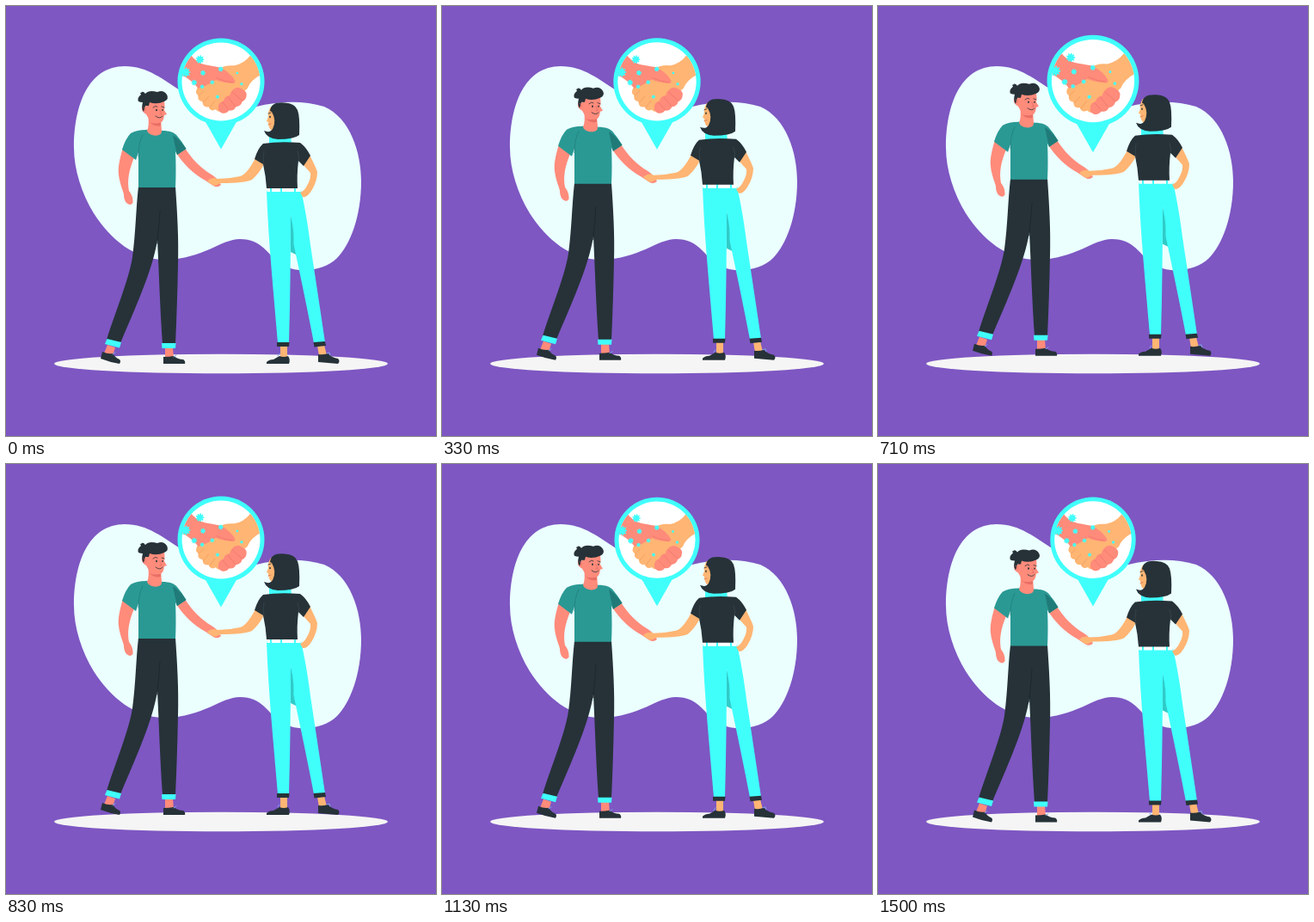
These frames come from a looping animation (500x500 px, 1540 ms). An HTML page with a canvas:

```html
<!DOCTYPE html>
<html lang="en">
<head>
<meta charset="utf-8">
<title>Handshake</title>
<style>
html, body { margin: 0; width: 100%; height: 100%; overflow: hidden; background: #7e57c2; }
canvas { display: block; }
</style>
</head>
<body>
<canvas id="stage" width="500" height="500"></canvas>
<script>
const ctx = document.getElementById('stage').getContext('2d');
const LOOP = 1540, STEP = 1000 / 24, LAST_STEP = 36;
const PURPLE = '#7e57c2', CYAN = '#40fffb', DARK = '#263238', TEAL = '#2a9994',
      ROSE = '#ff8b7b', PEACH = '#ffb573', ICE = '#ebffff', LACE = '#7ba4e8';

function fill(color, d) {
  ctx.fillStyle = color;
  ctx.fill(new Path2D(d));
}

function line(color, width, d) {
  ctx.strokeStyle = color;
  ctx.lineWidth = width;
  ctx.lineCap = ctx.lineJoin = 'round';
  ctx.stroke(new Path2D(d));
}

function oval(color, x, y, rx, ry = rx) {
  ctx.fillStyle = color;
  ctx.beginPath();
  ctx.ellipse(x, y, rx, ry, 0, 0, Math.PI * 2);
  ctx.fill();
}

function background() {
  ctx.fillStyle = PURPLE;
  ctx.fillRect(0, 0, 500, 500);
  fill(ICE, 'M138 70C165 70 183 86 204 99C235 119 262 123 291 117C315 111 345 109 370 117C400 130 413 170 413 204C413 245 400 278 385 293C370 308 338 313 318 299C304 289 298 271 272 271C250 271 230 294 185 295C150 295 122 272 102 241C88 218 79 190 79 165C79 115 96 70 138 70Z');
  oval('#f5f5f5', 250, 416, 194, 11.3);
}

function man() {
  // Ankles and shoes
  fill(ROSE, 'M118 394L127 397L124 407L114 404Z M185 396H194L195 410H185Z');
  fill(DARK, 'M112 402Q119 405 124 404Q127 409 132 411Q134 413 132 416Q120 414 110 410Z');
  fill(DARK, 'M183 408Q190 408 195 407Q200 411 206 411Q209 413 208 416H183Z');
  line(LACE, 1, 'M124 405L127 403 M195 408L198 406');
  // Trousers
  fill(DARK, 'M154 210H197C199 238 201 272 200 300Q199 350 197 393H182C179 350 178 312 176 272C171 306 149 354 133 392L117 388C127 356 143 318 147 292C151 262 151 236 154 210Z');
  line('#17242b', .7, 'M179 238Q178 256 175.5 276');
  fill(CYAN, 'M117.500 387L134 391L132 397.500L115 393Z M181 392H197.500L197 398H181.500Z');
  // Arms
  fill(ROSE, 'M136 165C132 178 130 188 131 196C132 206 136 214 137 219C137 226 140 231 145 231L147.500 229C148 223 146 219 143 215C141 204 142 192 150 174Z');
  fill(ROSE, 'M198 171L208 165C216 178 227 189 239 196Q247 201 250 208Q246 212 241 209L232 203C217 195 206 183 198 171Z');
  // Shirt
  fill(TEAL, 'M163 144Q173 142 182 145C190 145 196 147 199 151Q205 158 209.500 166L199 173L197 169Q198 192 197 211H154V170L151 179L135 167Q139 154 145 148Q152 144 163 144Z');
  fill('#207b78', 'M194 150Q202 155 209.500 166L199 173Q196 161 194 150Z');
  line('#207b78', .7, 'M159 150Q154 159 154 175');
  // Neck and head
  fill(ROSE, 'M165 126L180 132L181 145C182 153 166 152 164 145Q167 139 165 126Z');
  fill('#e96f66', 'M167 135Q173 138 180 135L180 139Q173 141 167 135Z');
  fill(ROSE, 'M162 109L184 110Q185 116 184 121L187 126L184 127Q183 136 178 136Q168 137 163 126Q157 123 158 117Q160 113 163 117Z');
  fill(DARK, 'M157 103Q152 107 154 111Q156 112 159 112Q157 119 160 123L162 116L166 116L167 112Q175 115 184 111Q190 108 187 103Q183 97 176 100Q166 97 162 102Q159 98 157 101Q155 100 157 103Z');
  line(DARK, .8, 'M171 118Q174 115 176 117 M181 117L184 118 M174 128Q179 132 182 128');
  oval(DARK, 175, 121, .9, 1.2);
  oval(DARK, 182, 121, .8, 1.1);
  line('#df6860', .7, 'M179 121L181 126L179 126');
  line('#df6860', .7, 'M160 118Q163 118 162 122');
}

function woman() {
  // Ankles and shoes
  fill(PEACH, 'M319 395H327V410H319Z M362 395L370 394L373 406L364 407Z');
  fill(DARK, 'M303 414Q306 411 311 411L318 407Q323 409 328 407Q331 411 329 416H303Z');
  fill(DARK, 'M363 405Q369 406 374 404Q379 409 386 410Q389 413 386 416L363 414Z');
  line(LACE, 1, 'M316 407L318 404 M373 404L376 403L377 406');
  // Trousers
  fill('#30cbc8', 'M330 238L339 290L331 286Z');
  fill(CYAN, 'M303 214H343C347 232 351 253 354 278Q363 337 371 391L358 392Q348 340 333 270L331 242Q331 322 329 392H316C311 331 305 273 303 214Z');
  fill('#30cbc8', 'M331 244Q336 263 334 281L331 272Z');
  fill(DARK, 'M315 391H329.500L329 396H315Z M357.500 391L371 390L372 395L358.500 396.500Z');
  fill('#ffffff', 'M303 211H342L343 216H303.500Z');
  fill(CYAN, 'M307 211H309V217H307Z M319 211H321V217H319Z M335 211H337V217H335Z');
  // Arms
  fill(PEACH, 'M290 177Q280 196 272 198Q259 201 246 201Q240 198 234 203Q237 207 243 209L250 206Q277 206 286 202Q294 195 300 184Z');
  fill(PEACH, 'M345 184L353 173Q361 189 362 193Q362 204 355 215Q350 223 345 222L342 217Q347 215 350 209Q355 200 354 194Z');
  // Collar and shirt
  fill(CYAN, 'M306 151Q318 155 331 151L332 161Q318 163 306 160Z');
  fill(DARK, 'M299 160Q318 157 342 159Q349 164 354 174L346 186L340 180Q338 197 339 212H303Q302 197 299 184L289 178Q293 165 299 160Z');
  line('#3b4950', .7, 'M300 169Q298 177 300 185 M339 169Q342 176 340 181');
  // Head
  fill(PEACH, 'M308 117Q304 123 305 129L303 134L305 135Q305 142 309 145L318 142V120Z');
  fill(DARK, 'M307 122Q308 111 324 112.500Q336 113 339 121Q342 129 341 150Q335 155 316 155Q303 154 300 145Q307 148 310 143Q315 133 309 123Z');
  line(DARK, .8, 'M305 125L308 124');
  oval(DARK, 307, 129, .8, 1.2);
  line('#d97451', .8, 'M305 138L308 137');
}

function virus(x, y, r) {
  oval(CYAN, x, y, r * .78);
  ctx.strokeStyle = CYAN;
  ctx.lineWidth = Math.max(.7, r * .34);
  ctx.beginPath();
  for (let i = 0; i < 9; i++) {
    const a = i * Math.PI * 2 / 9;
    ctx.moveTo(x, y);
    ctx.lineTo(x + Math.cos(a) * r * 1.1, y + Math.sin(a) * r * 1.1);
  }
  ctx.stroke();
}

function pin() {
  fill(CYAN, 'M230 130H270L250 165.300Z');
  oval(CYAN, 250, 88.200, 49.500);
  oval('#ffffff', 250, 88.200, 44.600);
  ctx.save();
  ctx.beginPath();
  ctx.arc(250, 88.200, 44.600, 0, Math.PI * 2);
  ctx.clip();
  // Right hand with its fingers below
  fill(PEACH, 'M300 45L283 59Q276 68 265 70Q254 69 247 74L224 94Q219 101 224 104Q223 110 229 111Q229 118 236 117Q238 123 244 120Q248 125 252 119L280 96Q284 85 300 78Z');
  line('#ed9b5f', .7, 'M225 104L230 99 M230 112L236 105 M237 118L243 110');
  // Left hand with its thumb and fingertips
  fill(ROSE, 'M200 47L214 56Q222 67 232 69L249 72Q261 78 266 87Q267 91 261 90Q251 89 244 86Q234 93 224 96Q217 86 200 78Z');
  fill(ROSE, 'M263 98Q268 93 273 96Q280 99 279 104Q279 109 274 111Q273 116 267 117Q265 122 259 121Q256 125 251 124Q246 122 247 117Q247 112 253 110Q254 105 260 104Q260 101 263 98Z');
  line('#ec7468', .7, 'M263 100L274 110 M258 106L266 116 M252 112L259 120 M245 84Q253 88 263 89');
  ctx.restore();
  virus(226, 63, 4.300);
  virus(209.500, 77.500, 5);
  virus(229.500, 78.300, 2.800);
  virus(219.500, 89.300, 3);
  virus(228.500, 94, 2.200);
  virus(249.800, 74, 2.700);
  virus(240, 89, 2.300);
  virus(246, 105.500, 2);
  virus(268.500, 78.500, 1.300);
  virus(273.500, 91, 1.600);
}

const beat = [[-70, 1], [150, 1.09], [430, 1], [530, 1], [700, 1.08], [900, 1], [1470, 1], [1690, 1.09]];

function beatScale(t) {
  const i = beat.findIndex(([end]) => end > t);
  const [t0, s0] = beat[i - 1], [t1, s1] = beat[i];
  const p = (1 - Math.cos(Math.PI * (t - t0) / (t1 - t0))) / 2;
  return s0 + (s1 - s0) * p;
}

function bobOffset(t) {
  const phase = ((t + 45) % LOOP) / LOOP;
  return .6 - 10 * (1 - Math.abs(2 * phase - 1));
}

function draw(now) {
  const elapsed = now % LOOP;
  const t = Math.min(LAST_STEP, Math.floor(elapsed / STEP + .13)) * STEP;
  background();

  ctx.save();
  ctx.translate(0, bobOffset(t));
  man();
  woman();
  ctx.restore();

  const scale = beatScale(t);
  ctx.save();
  ctx.translate(250, 102);
  ctx.scale(scale, scale);
  ctx.translate(-250, -102);
  pin();
  ctx.restore();
}

const start = performance.now();
function tick() {
  draw(performance.now() - start);
  requestAnimationFrame(tick);
}
tick();
</script>
</body>
</html>
```
